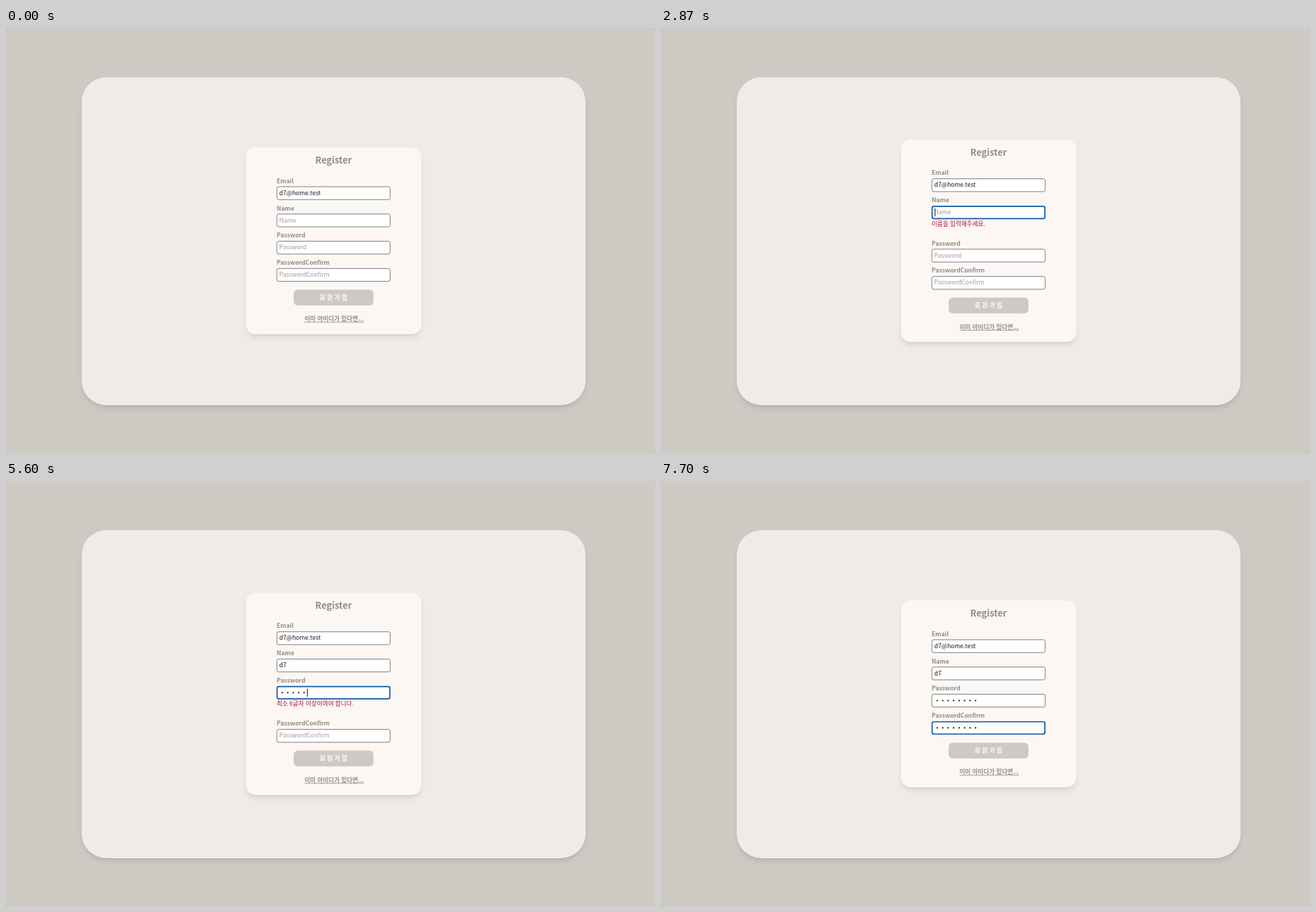
These frames come from a looping animation (925x605 px, 8000 ms). An HTML page:

```html
<!DOCTYPE html>
<html lang="ko">
<head>
<meta charset="utf-8">
<title>Register</title>
<style>
  html, body { margin: 0; width: 100%; height: 100%; overflow: hidden; background: #98948f; }
  #stage { position: absolute; left: 0; top: 0; width: 925px; height: 605px; background: #cec9c3; border-radius: 2px; overflow: hidden; }
  .box { position: absolute; box-shadow: 0 5.4px 8px -1.6px rgba(0,0,0,.1), 0 2.2px 3.2px -2.2px rgba(0,0,0,.1); }
  #panel { left: 108px; top: 69.5px; width: 717.5px; height: 467px; border-radius: 35px; background: #efece7; }
  #card { left: 341.5px; top: 170px; width: 250.5px; height: 266px; border-radius: 14px; background: #fcf7f3; }
  svg { position: absolute; left: 0; top: 0; }
  text { font: 8.64px "Noto Sans CJK KR", "Noto Sans CJK", "Noto Sans KR", sans-serif; white-space: pre; }
  .bold { font-weight: 700; fill: #918c88; }
  .title { font-size: 12.9px; }
  .value { fill: #1c1c20; }
  .hint { fill: #9b9ba0; }
  .error { fill: #a5124a; }
  .button { fill: #fff; letter-spacing: 2.6px; }
  .link { text-decoration: underline; text-decoration-thickness: .7px; }
</style>
</head>
<body>
<div id="stage">
  <div id="panel" class="box"></div>
  <div id="card" class="box"></div>
  <svg id="form" width="925" height="605" viewBox="0 0 925 605"></svg>
</div>
<script>
const LOOP = 8000;
const ROW = 38.8;      // distance between fields
const DOT = 7.8;       // width of a masked character
const GROW = 22.6;     // room taken by an error line
const MAX_DOTS = 8;

// time, name, password length, confirm length, focused row, caret, row with error
const STEPS = [
  [0,    '',   0, 0, -1, 0, -1],
  [1050, '',   0, 0, 1, 1, -1],
  [1540, '',   0, 0, 1, 0, -1],
  [1820, 'ㅏ', 0, 0, 1, 1, -1],
  [2380, 'ㅏ', 0, 0, 1, 0, -1],
  [2590, '',   0, 0, 1, 0, 1],
  [2870, '',   0, 0, 1, 1, 1],
  [3010, 'd',  0, 0, 1, 1, -1],
  [3150, 'd7', 0, 0, 1, 1, -1],
  [3570, 'd7', 0, 0, 2, 1, -1],
  [4060, 'd7', 0, 0, 2, 0, -1],
  [4620, 'd7', 1, 0, 2, 1, 2],
  [4690, 'd7', 2, 0, 2, 1, 2],
  [4760, 'd7', 3, 0, 2, 1, 2],
  [5040, 'd7', 4, 0, 2, 1, 2],
  [5600, 'd7', 5, 0, 2, 1, 2],
  [5670, 'd7', 6, 0, 2, 1, -1],
  [5740, 'd7', 7, 0, 2, 1, -1],
  [5810, 'd7', 8, 0, 2, 1, -1],
  [6160, 'd7', 8, 0, 3, 1, -1],
  [6440, 'd7', 8, 1, 3, 1, 3],
  [6510, 'd7', 8, 2, 3, 1, 3],
  [6580, 'd7', 8, 3, 3, 1, 3],
  [6650, 'd7', 8, 4, 3, 1, 3],
  [7000, 'd7', 8, 6, 3, 1, 3],
  [7070, 'd7', 8, 7, 3, 1, 3],
  [7210, 'd7', 8, 8, 3, 1, -1],
  [7700, 'd7', 8, 8, 3, 0, -1]
];

const LABELS = ['Email', 'Name', 'Password', 'PasswordConfirm'];
const ERRORS = ['', '이름을 입력해주세요.', '최소 6글자 이상이여야 합니다.', '패스워드가 일치하지 않습니다'];

const form = document.getElementById('form');
const card = document.getElementById('card');

function add(parent, tag, attrs, content = '') {
  const node = document.createElementNS('http://www.w3.org/2000/svg', tag);
  for (const key in attrs) node.setAttribute(key, attrs[key]);
  node.textContent = content;
  return parent.appendChild(node);
}

const label = (parent, x, y, cls, content) => add(parent, 'text', { x, y, class: cls }, content);
const show = (node, on) => node.setAttribute('visibility', on ? 'visible' : 'hidden');
const shift = (node, y) => node.setAttribute('transform', `translate(0 ${y})`);

const head = add(form, 'g', {});
add(head, 'text', { x: 466.8, y: 193, class: 'bold title', 'text-anchor': 'middle' }, 'Register');

const rows = LABELS.map((name, i) => {
  const g = add(form, 'g', {});
  label(g, 385.8, 220.8, 'bold', name);
  const frame = add(g, 'rect', { fill: '#fff' });
  const text = label(g, 389.6, 237.8, 'hint', name);
  const dots = Array.from({ length: i > 1 ? MAX_DOTS : 0 }, (_, k) =>
    add(g, 'circle', { cx: 393.7 + k * DOT, cy: 235, r: 1.15, fill: '#1c1c20' }));
  const caret = add(g, 'rect', { y: 229.3, width: 1, height: 11.4, fill: '#222' });
  const error = label(g, 385.8, 254, 'error', ERRORS[i]);
  return { g, name, frame, text, dots, caret, error };
});

const foot = add(form, 'g', {});
add(foot, 'rect', { x: 410, y: 372.5, width: 113.7, height: 22.5, rx: 6, fill: '#cec9c4' });
label(foot, 447, 386.5, 'bold button', '회원가입');
label(foot, 425.4, 417.4, 'bold link', '이미 아이디가 있다면...');

function drawFrame(frame, focused) {
  const w = focused ? 1.7 : 0.9;
  const attrs = {
    x: 385.6 + w / 2, y: 225.5 + w / 2, width: 162.4 - w, height: 19.2 - w, rx: 3 - w / 4,
    stroke: focused ? '#1259a8' : '#6d727a', 'stroke-width': w
  };
  for (const key in attrs) frame.setAttribute(key, attrs[key]);
}

function draw([, name, pass, confirm, focus, blink, bad]) {
  const rise = bad < 0 ? 0 : GROW / 2;
  card.style.top = 170 - rise + 'px';
  card.style.height = 266 + 2 * rise + 'px';
  shift(head, -rise);
  shift(foot, rise);

  const values = ['d7@home.test', name, '', ''];
  const counts = [0, 0, pass, confirm];
  rows.forEach((row, i) => {
    const lower = bad >= 0 && bad < 3 && i > bad;
    shift(row.g, i * ROW + (lower ? rise : -rise));
    drawFrame(row.frame, i === focus);
    row.text.textContent = values[i] || row.name;
    row.text.setAttribute('class', values[i] ? 'value' : 'hint');
    show(row.text, !counts[i]);
    row.dots.forEach((dot, k) => show(dot, k < counts[i]));
    const width = values[i] ? row.text.getComputedTextLength() : counts[i] * DOT;
    row.caret.setAttribute('x', 390 + width);
    show(row.caret, i === focus && blink);
    show(row.error, i === bad);
  });
}

let current = null;
const start = performance.now();

function tick() {
  const t = (performance.now() - start) % LOOP;
  const step = STEPS.filter(s => s[0] <= t).pop();
  if (step !== current) draw(current = step);
  requestAnimationFrame(tick);
}
tick();
</script>
</body>
</html>
```
